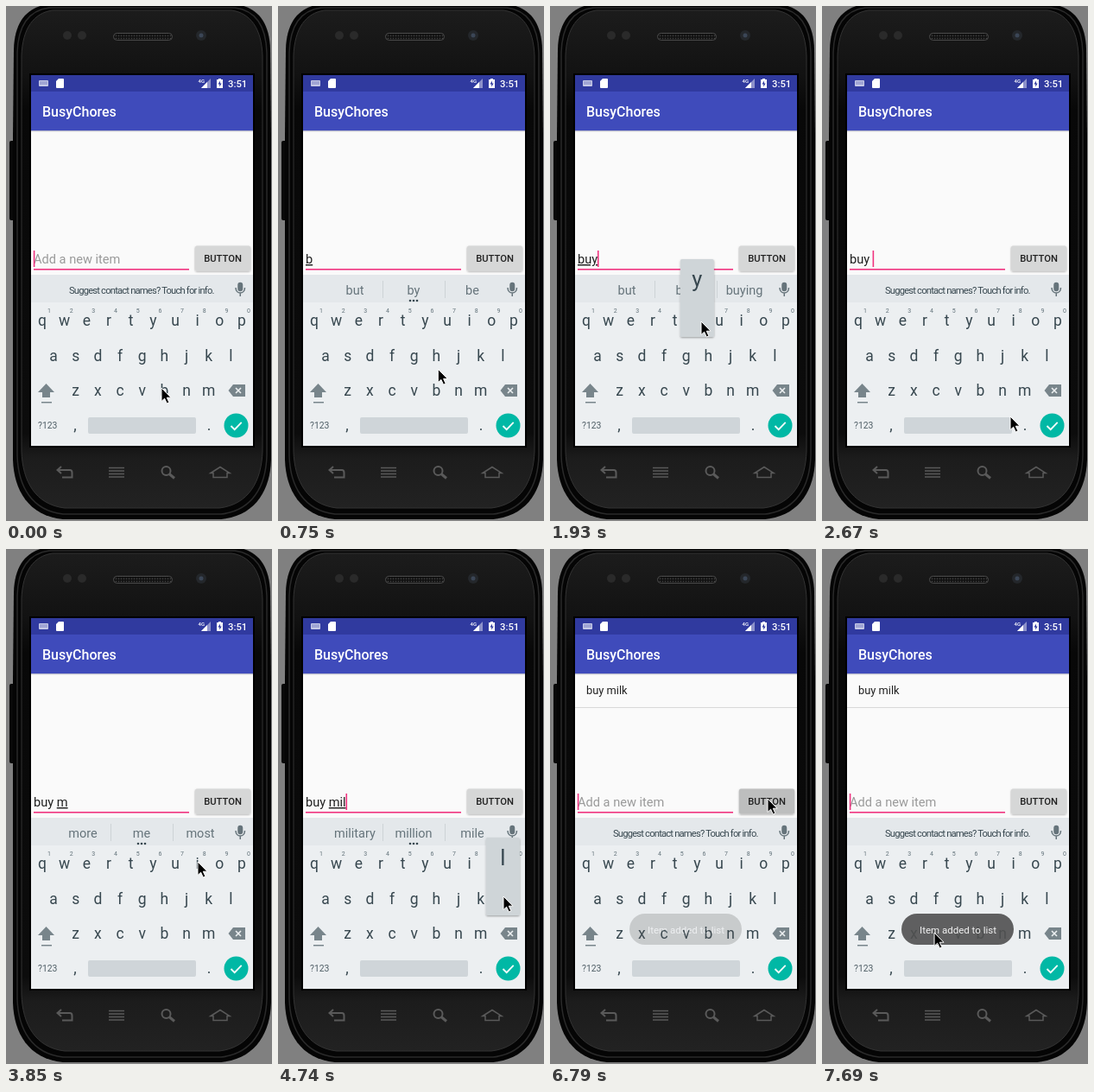
An HTML page for the animation above (8 s loop, 308 by 596 pixels).

```html
<!DOCTYPE html>
<html lang="en">
<head>
<meta charset="utf-8">
<title>Shopping note</title>
<style>
  html, body { margin: 0; width: 100%; height: 100%; overflow: hidden; background: #808080; }
  svg { display: block; width: 308px; height: 596px; }
  text { font-family: Roboto, "Noto Sans", sans-serif; white-space: pre; }
  .mid { text-anchor: middle; }
  .bold { font-weight: 500; }
  .key { font-size: 17.5px; fill: #37474f; }
  .digit { font-size: 7px; fill: #607078; }
  .word { font-size: 14.5px; fill: #66747b; }
  .field { font-size: 14.6px; fill: #212121; }
  #draft { text-decoration: underline; text-decoration-thickness: 1px; text-decoration-skip-ink: none; }
</style>
</head>
<body>
<svg viewBox="0 0 308 596">
  <defs>
    <linearGradient id="face" x2="0" y2="1">
      <stop offset="0" stop-color="#1c1c1c"/><stop offset=".13" stop-color="#121212"/>
      <stop offset=".2" stop-color="#080808"/><stop offset=".85" stop-color="#0c0c0c"/>
      <stop offset=".9" stop-color="#1c1c1c"/><stop offset="1" stop-color="#222"/>
    </linearGradient>
    <pattern id="mesh" width="3" height="3" patternUnits="userSpaceOnUse">
      <rect width="3" height="3" fill="#111"/><circle cx="1.5" cy="1.5" r=".8" fill="#444"/>
    </pattern>
    <filter id="soft" x="-20%" y="-20%" width="140%" height="140%">
      <feDropShadow dx="0" dy="1" stdDeviation="1" flood-opacity=".35"/>
    </filter>
  </defs>

  <!-- phone -->
  <rect x="4" y="156" width="6" height="92" rx="2" fill="#080808"/>
  <path d="M48-2C24 2 10 18 9 50L8 150V525C9 560 26 590 66 594H249C289 590 306 560 307 525V150L306 50C305 18 291 2 267-2Z" fill="#050505"/>
  <path d="M50 2C27 5 14 22 13 54V520C14 556 30 584 66 588H249C285 584 301 556 302 520V54C301 22 288 5 265 2Z" fill="none" stroke="#2a2a2a" stroke-width="1.500"/>
  <path d="M54 5C32 8 19 26 18 58V515C19 550 34 577 68 581H247C281 577 296 550 297 515V58C296 26 283 8 261 5Z" fill="url(#face)" stroke="#333"/>
  <rect x="124.500" y="31.500" width="68" height="8" rx="4" fill="url(#mesh)" stroke="#4a4a4a"/>
  <g fill="#2a2a2a"><circle cx="71" cy="34" r="5"/><circle cx="88" cy="34" r="5"/></g>
  <circle cx="226" cy="34" r="6" fill="#24272b"/><circle cx="226" cy="34" r="2.500" fill="#3b4656"/>
  <g fill="none" stroke="#5a5a5a" stroke-width="2">
    <path d="M64 533l-4.500 4 4.500 4M60 537H74Q76.500 537 76.500 540V545.500H65"/>
    <path d="M119 534.500H137M119 538H137M119 541.500H137M119 545H137" stroke-width="1.500"/>
    <circle cx="185.500" cy="538" r="5"/><path d="M189 541.500l6 5" stroke-width="3"/>
    <path d="M237 540.500L248 533.500 259 540.500H256V545.500H240V540.500Z" stroke-width="1.500"/>
  </g>

  <!-- app -->
  <rect x="27" y="78" width="261" height="433" fill="#000"/>
  <rect x="29" y="80" width="257" height="429" fill="#fafafa"/>
  <rect x="29" y="144" width="257" height="1" fill="#b4b6cc"/>
  <rect x="29" y="145" width="257" height="1" fill="#ececec"/>
  <rect x="29" y="99" width="257" height="45" fill="#3f4bbb"/>
  <rect x="29" y="80" width="257" height="19" fill="#303a9f"/>
  <g fill="#fff">
    <rect x="38" y="86" width="11" height="7" rx="1" fill="#c5c9e6"/>
    <path d="M39.500 88H48M39.500 90H48" stroke="#303a9f" stroke-dasharray="1 1"/>
    <path d="M61 84H66Q67 84 67 85V94Q67 95 66 95H59Q58 95 58 94V87Z"/>
    <path d="M226 95L237 84V95Z" opacity=".45"/><path d="M226 95L233 88V95Z"/>
    <text x="222.500" y="89" font-size="6" class="bold">4G</text>
    <path d="M246 84H249V85H251V95H244V85H246Z"/>
    <path d="M248 86.500L245.500 90.500H247.200V93.500L249.700 89.500H248Z" fill="#303a9f"/>
    <text x="257" y="94" font-size="11.300" class="bold">3:51</text>
    <text x="42" y="127.600" font-size="16" class="bold">BusyChores</text>
  </g>
  <g id="item">
    <text x="42" y="168" font-size="12.850" fill="#212121">buy milk</text>
    <rect x="29" y="183" width="257" height="1" fill="#d8d8d8"/>
  </g>
  <text id="hint" class="field" x="32" y="298" style="fill:#9a9a9a">Add a new item</text>
  <text id="entry" class="field" x="32" y="298"><tspan id="done"></tspan><tspan id="draft"></tspan></text>
  <rect x="32" y="304" width="180" height="1.600" fill="#f0337f"/>
  <rect id="caret" y="283" width="1.600" height="19" fill="#f0337f"/>
  <rect id="button" x="219" y="277.500" width="64" height="29" rx="2" filter="url(#soft)"/>
  <text x="251" y="296" class="mid bold" font-size="11.240" fill="#212121">BUTTON</text>

  <!-- keyboard -->
  <rect x="29" y="311" width="257" height="198" fill="#eceff1"/>
  <rect x="29" y="311" width="257" height="32" fill="#e4e8eb"/>
  <text id="notice" x="73" y="333" font-size="11.200" letter-spacing="-.8" fill="#37474f">Suggest contact names? Touch for info.</text>
  <g id="words">
    <path d="M121.500 318V338M193.500 318V338" stroke="#cdd3d6"/>
    <g fill="#37474f"><circle cx="153" cy="341" r="1.300"/><circle cx="157" cy="341" r="1.300"/><circle cx="161" cy="341" r="1.300"/></g>
    <text class="word mid" x="89" y="334"></text>
    <text class="word mid" x="157" y="334"></text>
    <text class="word mid" x="225" y="334"></text>
  </g>
  <g fill="none" stroke="#66747b" stroke-width="1.500">
    <rect x="269" y="320.500" width="4.500" height="9" rx="2.250" fill="#66747b"/>
    <path d="M266 326C266 334 276.500 334 276.500 326M271.250 332V336"/>
  </g>
  <g id="keys"></g>
  <path d="M46.500 437L56 447H51V453H42V447H37Z" fill="#78858b"/>
  <rect x="41" y="458" width="12" height="1.500" fill="#78858b"/>
  <path d="M263 438H277V452H263L257.500 445Z" fill="#78858b"/>
  <path d="M266 442l6 6m0-6l-6 6" stroke="#eceff1" stroke-width="1.600"/>
  <text x="37" y="489" font-size="10.400" fill="#4f5e66">?123</text>
  <rect x="95" y="476" width="125" height="19" rx="2" fill="#cfd5d9"/>
  <circle cx="266.500" cy="485.500" r="14" fill="#00b8a5"/>
  <path d="M260.500 486l4.200 4.200 8-8.400" fill="none" stroke="#fff" stroke-width="1.800"/>

  <g id="popup">
    <rect x="-19.500" y="-77" width="39" height="90" rx="2" fill="#cfd5d8" filter="url(#soft)"/>
    <text class="mid" y="-45" font-size="25.500" fill="#37474f"></text>
  </g>
  <g id="toast">
    <rect x="92" y="422" width="130" height="36" rx="18" fill="#505050" opacity=".9"/>
    <text x="113" y="445" font-size="11.500" fill="#f2f2f2">Item added to list</text>
  </g>
  <path id="pointer" d="M0 0V15.500L3.600 12.200 6.300 18 8.900 16.800 6.300 11.200H11Z" fill="#000" stroke="#fff"/>
</svg>
<script>
const LOOP = 8000, STEP = 147.9, LEAD = 25;
const $ = id => document.getElementById(id);
const show = (el, on) => el.setAttribute("visibility", on ? "visible" : "hidden");

// start tick, finished text, word being typed, suggestions
const typing = [
  [0, "", "", ""],
  [1, "", "b", "but by be"],
  [7, "", "bu", "but by built"],
  [12, "", "buy", "but buy buying"],
  [16, "buy ", "", ""],
  [22, "buy ", "m", "more me most"],
  [27, "buy ", "mi", "mind might miss"],
  [31, "buy ", "mil", "military million mile"],
  [37, "buy ", "milk", "mill milk milks"],
  [46, "", "", ""]
];

// tick, x, y
const route = [
  [0, 180, 442], [4, 180, 442], [7, 200.5, 358], [9, 200.5, 358],
  [11, 175, 365], [13, 175, 365], [15, 212, 487], [16, 218, 475],
  [18, 218, 475], [20, 228, 449], [23, 228, 449], [26, 222, 362],
  [28, 222, 362], [29, 249, 385], [30, 261, 402], [33, 261, 402],
  [35, 232, 402], [39, 232, 402], [42, 262, 340], [45, 252, 289],
  [46, 252, 289], [52, 130, 444]
];

const spots = {};
function addText(cls, x, y, str) {
  const el = document.createElementNS("http://www.w3.org/2000/svg", "text");
  el.setAttribute("class", cls + " mid");
  el.setAttribute("x", x);
  el.setAttribute("y", y);
  el.textContent = str;
  $("keys").append(el);
}
function addRow(letters, left, y) {
  [...letters].forEach((c, i) => {
    const x = left + i * 25.67;
    spots[c] = [x, y];
    addText("key", x, y, c);
  });
}
addRow("qwertyuiop", 42, 370);
addRow("asdfghjkl", 55, 411);
addRow("zxcvbnm", 80.7, 451);
addText("key", 80, 491, ",");
addText("key", 235, 491, ".");
[..."1234567890"].forEach((d, i) => addText("digit", 50 + i * 25.67, 355, d));

const wordEls = document.querySelectorAll(".word");
const popupText = $("popup").querySelector("text");
const stateAt = tick => typing.findLast(s => s[0] <= tick) || typing[0];

function pointerAt(tick) {
  const i = route.findIndex(p => p[0] > tick);
  if (i < 0) return route.at(-1).slice(1);
  const [t0, x0, y0] = route[i - 1], [t1, x1, y1] = route[i];
  const u = (tick - t0) / (t1 - t0), e = u * u * (3 - 2 * u);
  return [x0 + (x1 - x0) * e, y0 + (y1 - y0) * e];
}

function draw(time) {
  const tick = Math.min(52, Math.floor((time + LEAD) / STEP));
  const [start, done, draft] = stateAt(tick);
  const age = tick - start;

  $("done").textContent = done;
  $("draft").textContent = draft;
  show($("hint"), !(done + draft));
  const width = done + draft ? $("entry").getComputedTextLength() : 0;
  $("caret").setAttribute("x", 31.8 + width);
  show($("caret"), age % 6 < 4);

  // suggestions follow the typed letter one tick later
  const words = draft ? stateAt(tick - 1)[3] : "";
  show($("notice"), !words);
  show($("words"), words);
  wordEls.forEach((el, i) => el.textContent = words.split(" ")[i] || "");

  const letter = draft.slice(-1);
  show($("popup"), letter && age < 2);
  if (letter) {
    $("popup").setAttribute("transform", `translate(${spots[letter]})`);
    popupText.textContent = letter;
  }

  show($("item"), tick >= 46);
  $("button").setAttribute("fill", tick === 46 ? "#bdbebe" : "#d6d7d7");
  $("toast").setAttribute("opacity", Math.max(0, Math.min(1, (tick - 45) / 4)));
  $("pointer").setAttribute("transform", `translate(${pointerAt(tick)})`);
}

const begin = performance.now();
function loop() {
  draw((performance.now() - begin) % LOOP);
  requestAnimationFrame(loop);
}
loop();
</script>
</body>
</html>
```
